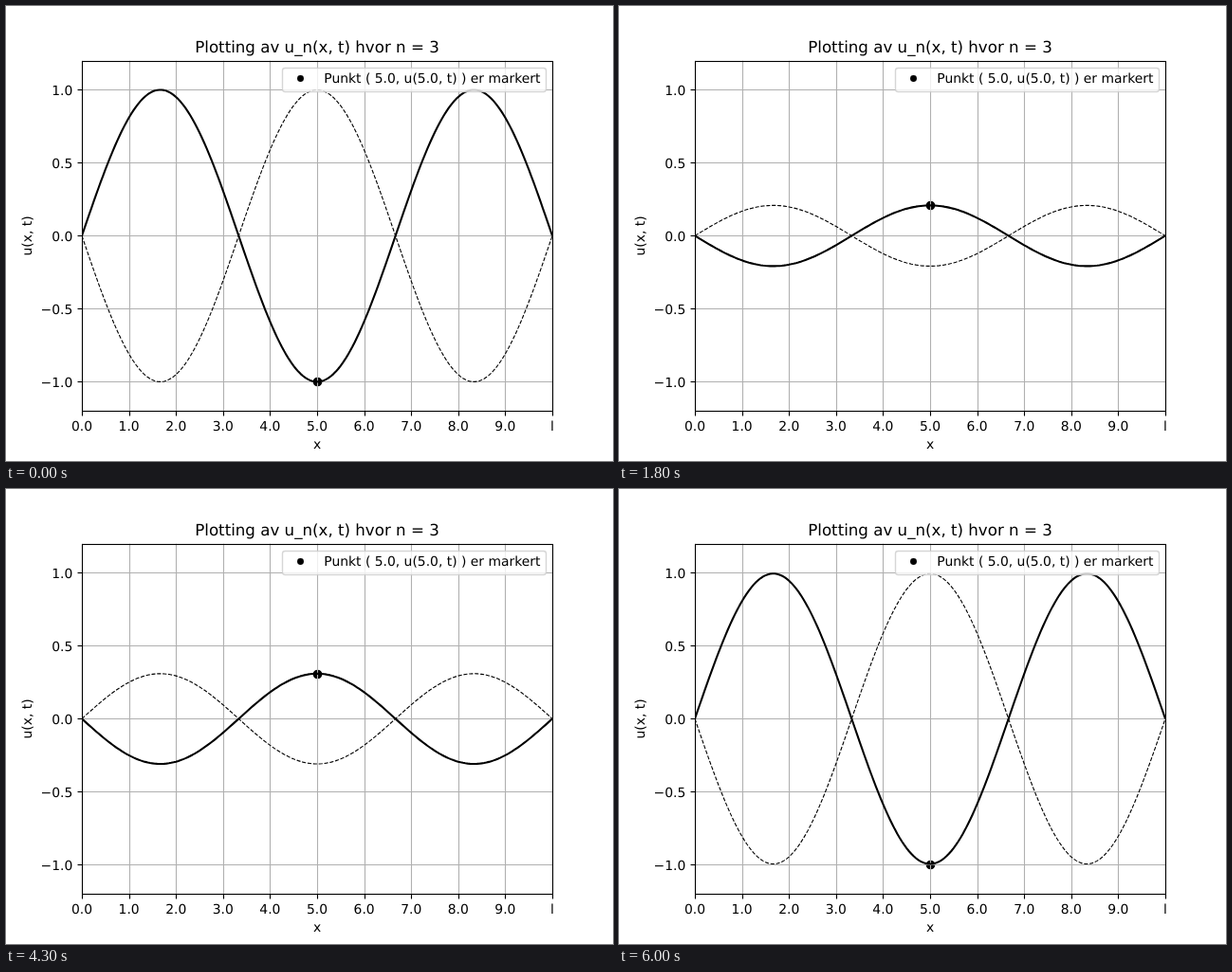
An HTML page with a canvas that plays this animation: 640x480 px, repeating every 6100 ms.

```html
<!DOCTYPE html>
<html lang="no">
<head>
<meta charset="utf-8">
<title>Plotting av u_n(x, t)</title>
<style>
  html, body { margin: 0; width: 100%; height: 100%; overflow: hidden; background: #fff; }
  canvas { display: block; }
</style>
</head>
<body>
<canvas id="stage" width="640" height="480"></canvas>
<script>
const c = document.getElementById('stage').getContext('2d');
const LEFT = 80, RIGHT = 576, TOP = 57.6, BOTTOM = 427.2;
const PT = 100 / 72, HAIR = 0.8 * PT;
const STEP = 100, STEPS = 60, LOOP = 6100;

const px = x => LEFT + 49.6 * x;
const py = u => 242.4 - 154 * u;
const snap = v => Math.round(v) + 0.5;
const xTicks = Array.from({ length: 11 }, (_, i) => i);
const yTicks = [-1, -0.5, 0, 0.5, 1];

function line(x1, y1, x2, y2, color) {
  c.strokeStyle = color;
  c.lineWidth = HAIR;
  c.beginPath();
  c.moveTo(x1, y1);
  c.lineTo(x2, y2);
  c.stroke();
}

function dot(x, y, diameter) {
  c.fillStyle = '#000';
  c.beginPath();
  c.arc(x, y, diameter / 2, 0, 2 * Math.PI);
  c.fill();
}

function text(str, x, y, align = 'center', size = 10) {
  c.font = `${size * PT}px "DejaVu Sans", sans-serif`;
  c.textRendering = 'geometricPrecision';
  c.textAlign = align;
  c.fillStyle = '#000';
  c.fillText(str, x, y);
}

function wave(amplitude, width, dash = []) {
  c.strokeStyle = '#000';
  c.lineWidth = width;
  c.lineJoin = 'round';
  c.setLineDash(dash);
  c.beginPath();
  for (let i = 0; i <= 200; i++) {
    const x = i / 20;
    c.lineTo(px(x), py(amplitude * Math.sin(3 * Math.PI * x / 10)));
  }
  c.stroke();
  c.setLineDash([]);
}

function drawAxes() {
  for (const x of xTicks) {
    const sx = snap(px(x));
    line(sx, 428, sx, 432.5, '#000');
    text(x === 10 ? 'l' : x.toFixed(1), px(x), 448);
  }
  for (const u of yTicks) {
    const sy = snap(py(u));
    line(75.5, sy, 80, sy, '#000');
    text(u.toFixed(1).replace('-', '\u2212'), 70.3, sy + 5, 'right');
  }
  c.strokeStyle = '#000';
  c.lineWidth = HAIR;
  c.strokeRect(80.5, 58.5, 496, 369);

  text('Plotting av u_n(x, t) hvor n = 3', 328, 49, 'center', 12);
  text('x', 328, 467);
  c.save();
  c.translate(27, 242.4);
  c.rotate(-Math.PI / 2);
  text('u(x, t)', 0, 0);
  c.restore();
}

function drawLegend() {
  c.save();
  c.globalAlpha = 0.8;
  c.fillStyle = '#fff';
  c.strokeStyle = '#ccc';
  c.lineWidth = PT;
  c.beginPath();
  c.roundRect(291.5, 65.5, 278, 25, 2.8);
  c.fill();
  c.stroke();
  c.restore();
  dot(310.5, 76.5, 5 * PT);
  text('Punkt ( 5.0, u(5.0, t) ) er markert', 335.3, 81, 'left');
}

function draw(now) {
  // The start pose is held for two steps.
  const step = Math.max(0, Math.floor(now % LOOP / STEP) - 1);
  const amplitude = Math.cos(2 * Math.PI * step / STEPS);

  c.fillStyle = '#fff';
  c.fillRect(0, 0, 640, 480);

  c.save();
  c.beginPath();
  c.rect(LEFT, TOP, RIGHT - LEFT, BOTTOM - TOP);
  c.clip();
  // The grid lies over the marked point but under the curves.
  dot(snap(px(5)), snap(py(-amplitude)), 7 * PT);
  for (const x of xTicks) line(snap(px(x)), TOP, snap(px(x)), BOTTOM, '#b0b0b0');
  for (const u of yTicks) line(LEFT, snap(py(u)), RIGHT, snap(py(u)), '#b0b0b0');
  wave(amplitude, 1.5 * PT);
  wave(-amplitude, HAIR, [3.7 * HAIR, 1.6 * HAIR]);
  c.restore();

  drawAxes();
  drawLegend();
}

const start = performance.now();
function tick() {
  draw(performance.now() - start);
  requestAnimationFrame(tick);
}
tick();
</script>
</body>
</html>
```
